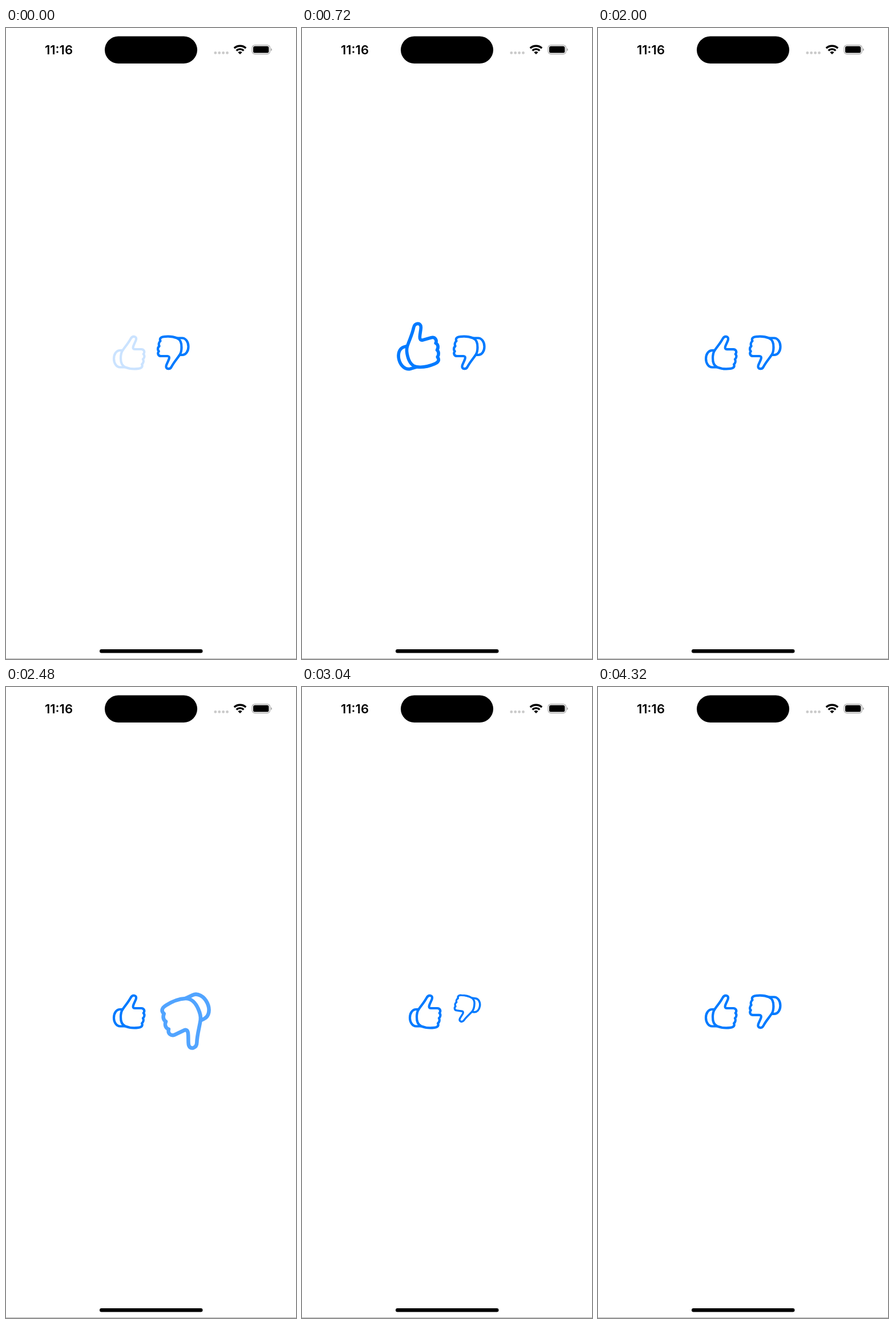
An HTML page that plays this animation: 508x1102 px, repeating every 4.4 s.

```html
<!DOCTYPE html>
<html lang="en">
<head>
<meta charset="utf-8">
<title>Thumbs</title>
<style>
  html, body { margin: 0; width: 100%; height: 100%; overflow: hidden; background: #fff; }
  svg { display: block; width: 100%; height: 100%; }
  .clock { font: 600 22px Inter, "Liberation Sans", sans-serif; text-anchor: middle; }
  .thumb { fill: none; stroke: #007aff; stroke-width: 4.2; stroke-linejoin: round; }
</style>
</head>
<body>
<svg viewBox="0 0 508 1102">
  <defs>
    <g id="hand">
      <path d="M204 563.5C209 556 214 551 218.5 542.5C220 539.5 222 538.6 224.3 538.8
        C227.4 539.2 228.6 541.5 227.8 544.5C226.8 548 224.5 551.5 223 556
        C222 559 222.8 561 225.5 561L237 561C241.5 561 244 565.5 240.7 569.5
        C243.2 571.5 243 576 239.9 578.5C241.6 581 241 585 238 587.3
        C239.8 591 238 594.3 232 594.9C225 595.8 216 595.4 209 592.5
        C203 590 200.8 583 201 576C201.1 571 202 566.5 204 563.5Z"/>
      <path d="M204 563H200C193 563 189 570 189 577.5C189 586 194 592.5 200 592.5H209"/>
    </g>
  </defs>

  <text class="clock" x="92.5" y="46">11:16</text>
  <rect x="173" y="14.5" width="162" height="47.5" rx="23.75"/>
  <g fill="#cacaca">
    <circle cx="366.8" cy="43.4" r="2.4"/>
    <circle cx="373.7" cy="43.4" r="2.4"/>
    <circle cx="380.6" cy="43.4" r="2.4"/>
    <circle cx="387.5" cy="43.4" r="2.4"/>
  </g>
  <g fill="none" stroke="#000" stroke-width="3.4">
    <path d="M399.8 35.2A15 15 0 0 1 420.2 35.2"/>
    <path d="M403.6 39.4A9.4 9.4 0 0 1 416.4 39.4"/>
  </g>
  <path d="M410 46L406.4 42.4A5.2 5.2 0 0 1 413.6 42.4Z"/>
  <rect x="431.1" y="29.8" width="31.4" height="15.8" rx="5" fill="none" stroke="#a6a6a6" stroke-width="1.2"/>
  <rect x="433" y="31.8" width="27.4" height="11.8" rx="3.2"/>
  <path d="M464 35.2Q466 36 466 37.7T464 40.2Z" fill="#a6a6a6"/>

  <use id="up" class="thumb" href="#hand"/>
  <use id="down" class="thumb" href="#hand"/>

  <rect x="164" y="1085" width="180.5" height="6.4" rx="3.2"/>
  <rect y="1101" width="508" height="1" fill="#b4b4b4"/>
</svg>
<script>
const LOOP = 4400, STEP = 80;
const HOLD = 426;              // ms between the spring out and the spring back
const PIVOT = "-34 36";        // rotation anchor, relative to the icon centre

const thumbs = [
  { el: document.getElementById("up"), x: 215.5, flip: 0, press: 0, start: 170 },
  { el: document.getElementById("down"), x: 293, flip: 180, press: 2240, start: 2390 }
];

// Remaining distance of an underdamped spring, 1 at rest before ms = 0
function spring(ms, response, damping) {
  if (ms <= 0) return 1;
  const t = ms / 1000, w = 2 * Math.PI / response;
  const root = Math.sqrt(1 - damping * damping), wd = w * root;
  return Math.exp(-damping * w * t) * (Math.cos(wd * t) + damping / root * Math.sin(wd * t));
}

const rise = ms => 1 - spring(ms, 0.42, 0.41);

function pose(ms) {
  return rise(Math.min(ms, HOLD)) * spring(ms - HOLD, 0.55, 0.35);
}

function opacity(t, { press, start }) {
  if (t < press) return 1;
  const fade = Math.min(1, Math.max(0, (t - start) / 150));
  return 0.2 + 0.8 * fade;
}

function draw(t) {
  for (const thumb of thumbs) {
    const p = pose(t - thumb.start);
    thumb.el.setAttribute("transform",
      `translate(${thumb.x} 567) rotate(${thumb.flip}) scale(${1 + p}) ` +
      `rotate(${-45 * p} ${PIVOT}) translate(-215.5 -567)`);
    thumb.el.setAttribute("opacity", opacity(t, thumb));
  }
}

const begin = performance.now();
function tick() {
  const t = (performance.now() - begin) % LOOP;
  draw(Math.floor(t / STEP) * STEP);
  requestAnimationFrame(tick);
}
tick();
</script>
</body>
</html>
```
